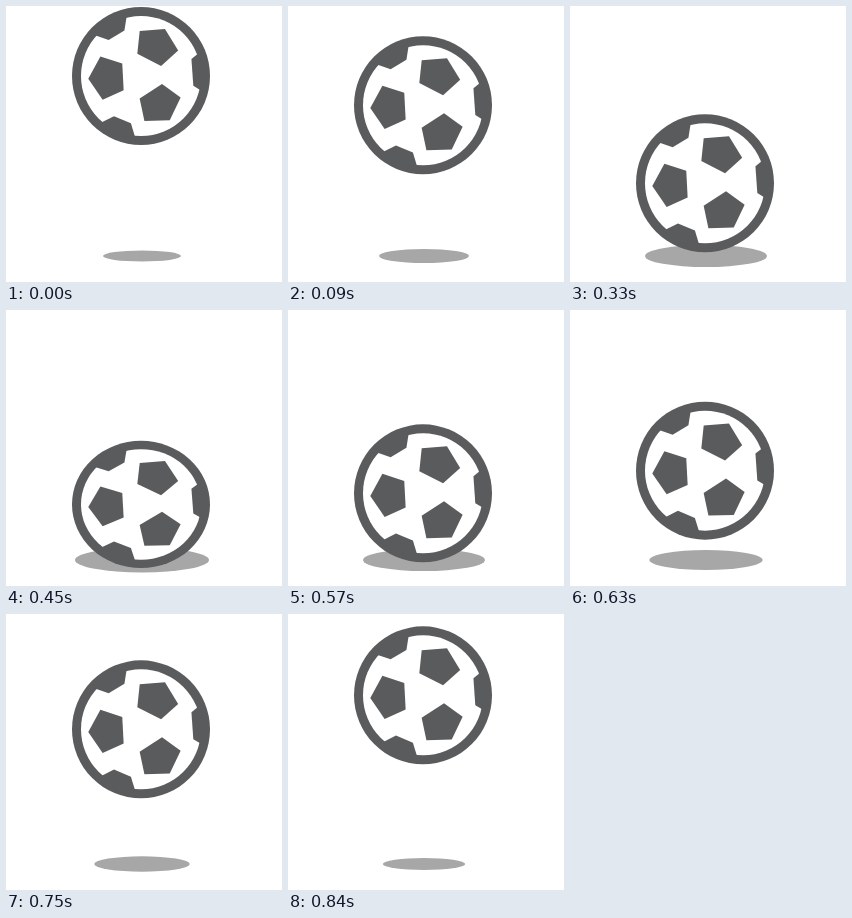
An HTML page with a canvas that plays this animation: 276 by 276 pixels, repeating every 0.87 s.

```html
<!DOCTYPE html>
<html lang="en">
<head>
<meta charset="utf-8">
<title>Bouncing ball</title>
<style>
html, body { margin: 0; width: 100%; height: 100%; overflow: hidden; background: #fff; }
canvas { display: block; }
</style>
</head>
<body>
<canvas id="stage" width="276" height="276"></canvas>
<script>
const ctx = document.getElementById('stage').getContext('2d');
const STEP = 30, STEPS = 29;
const DARK = '#5a5b5d', SHADE = '#a7a7a7';
const RADIUS = 69, INNER = 60;
const TOP = 70, DROP = 119;
const FALL = 9.75, RISE = 11.33;
const LAND = DROP / FALL, LEAVE = STEPS - DROP / RISE;
const TURN = Math.PI * 2;
const radians = degrees => degrees * Math.PI / 180;

function disc(x, y, rx, ry, color) {
  ctx.fillStyle = color;
  ctx.beginPath();
  ctx.ellipse(x, y, rx, ry, 0, 0, TURN);
  ctx.fill();
}

// Points are [outward, sideways] along the given direction from the ball centre.
function patch(degrees, points) {
  ctx.save();
  ctx.rotate(radians(degrees));
  ctx.fillStyle = DARK;
  ctx.beginPath();
  points.forEach(([out, side]) => ctx.lineTo(out, side));
  ctx.fill();
  ctx.restore();
}

// A pentagon slightly foreshortened towards the rim.
const pentagon = Array.from({ length: 5 }, (_, i) => {
  const a = i * TURN / 5;
  return [33.6 + 19.2 * Math.cos(a), 22.7 * Math.sin(a)];
});

// A pentagon cut off by the rim, so only its inner side shows.
const rimPatch = (inner, half) =>
  [[inner, -half], [inner, half], [58, 18], [66, 0], [58, -18]];

function drawBall(depth, squash) {
  ctx.save();
  ctx.translate(135, TOP + depth + RADIUS);
  ctx.scale(1, 1 - squash);
  ctx.translate(0, -RADIUS);
  disc(0, 0, RADIUS, RADIUS, DARK);
  disc(0, 0, INNER, INNER, '#fff');
  for (let i = -1; i <= 1; i++) {
    patch(177 + 120 * i, pentagon);
    patch(-4 + 117 * i, i ? rimPatch(47.5, 9.2) : rimPatch(51.5, 13.5));
  }
  ctx.restore();
}

function drawShadow(n) {
  const growth = Math.min(n, (STEPS - n) * 1.1, 14);
  disc(136, 250, 39 + 2 * growth, 5.5 + 0.5 * growth, SHADE);
}

function render(ms) {
  const n = Math.floor(ms / STEP) % STEPS;
  const depth = Math.min(n * FALL, (STEPS - n) * RISE, DROP);
  const contact = (n - LAND) / (LEAVE - LAND);
  const squash = contact > 0 && contact < 1 ? 0.08 * Math.sin(Math.PI * contact) : 0;
  ctx.fillStyle = '#fff';
  ctx.fillRect(0, 0, 276, 276);
  drawShadow(n);
  drawBall(depth, squash);
}

let start;
function tick(now) {
  start ??= now;
  render(Math.max(0, now - start));
  requestAnimationFrame(tick);
}
render(0);
requestAnimationFrame(tick);
</script>
</body>
</html>
```
